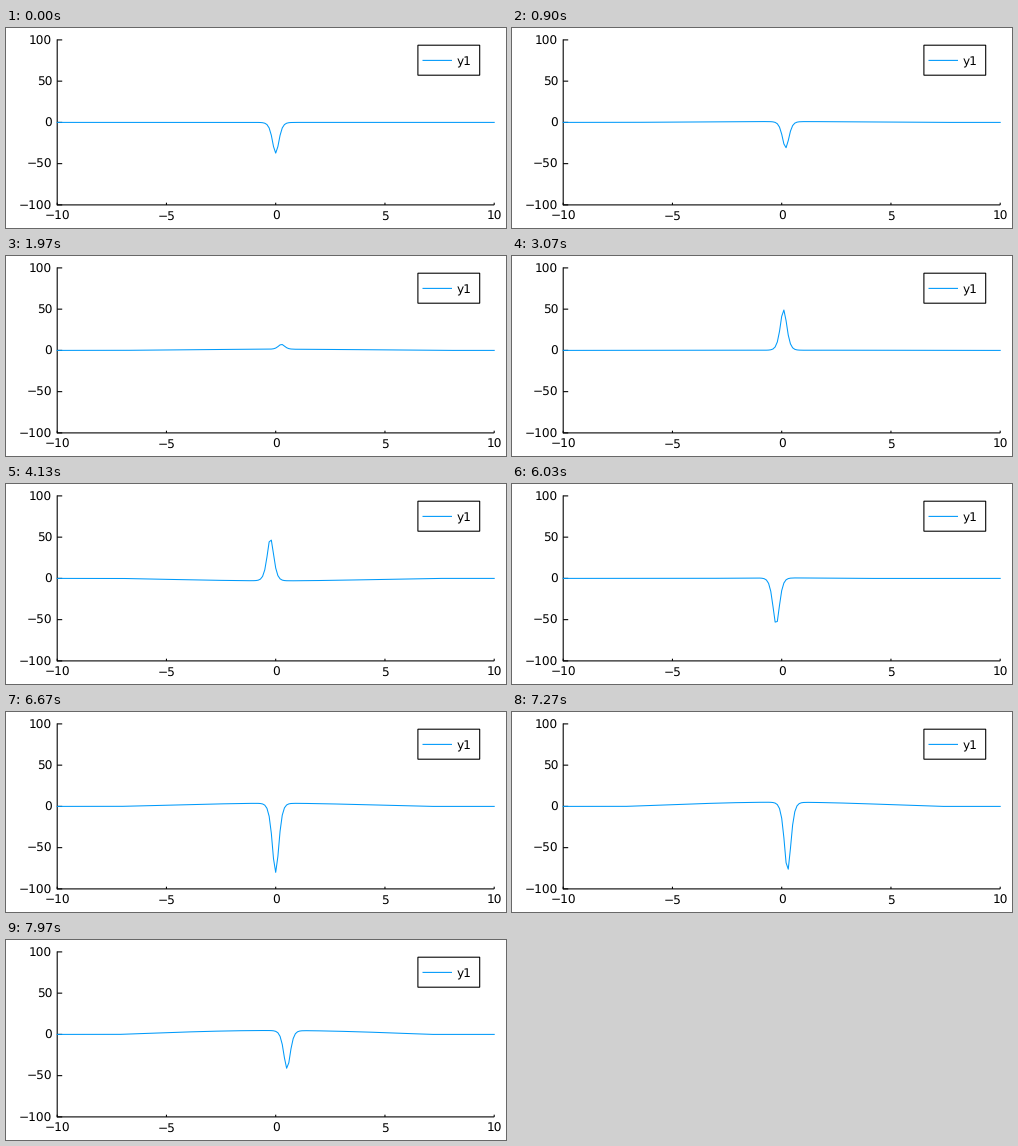
A matplotlib script that plays this animation: 500 px wide and 200 px high, repeating every 8000 ms.

```python
import numpy as np
import matplotlib.pyplot as plt
from matplotlib.animation import FuncAnimation
from matplotlib.patches import Rectangle

W, H, DPI = 500, 200, 100
STEP, FRAMES = 32, 250
LEFT, RIGHT, TOP, BOTTOM = 51.2, 488.2, 11.9, 176.9
BLUE = "#009AFA"
LINE, FONT = 0.78, 8.7
OMEGA = 2 * np.pi * 3 / 20
GROWTH = 0.115

plt.rcParams["font.family"] = "DejaVu Sans"
plt.rcParams["text.hinting"] = "none"
fig = plt.figure(figsize=(W / DPI, H / DPI), dpi=DPI, facecolor="white")
ax = fig.add_axes([0, 0, 1, 1])
ax.set_xlim(0, W)
ax.set_ylim(H, 0)
ax.axis("off")


def px(x):
    return LEFT + (x + 10) / 20 * (RIGHT - LEFT)


def py(y):
    return BOTTOM - (y + 100) / 200 * (BOTTOM - TOP)


def rule(xs, ys, color="black", z=2):
    ax.plot(xs, ys, color=color, lw=LINE, solid_capstyle="butt",
            snap=False, zorder=z)


def label(x, y, text, ha="left"):
    ax.text(x, y, text.replace("-", "\u2212"), fontsize=FONT, ha=ha,
            va="baseline", color="black", zorder=5)


# Axes, ticks and labels
rule([LEFT, LEFT], [TOP - 0.5, BOTTOM + 0.5])
rule([LEFT, RIGHT], [BOTTOM, BOTTOM])
for v in range(-100, 101, 50):
    rule([LEFT, LEFT + 5], [py(v), py(v)])
    label(46.2, py(v) + 4.5, str(v), "right")
for v in range(-10, 11, 5):
    rule([px(v), px(v)], [BOTTOM, BOTTOM - 2.2])
    label(px(v), 191.7, str(v), "center")

# Legend
ax.add_patch(Rectangle((411.9, 17.2), 61.8, 30, fc="white", ec="black",
                       lw=LINE, snap=False, zorder=4))
rule([416.5, 446], [32.4, 32.4], BLUE, 5)
label(450.3, 37, "y1")

# Height of the broad swell around the pulse, over time in seconds
SWELL_T = [0, 0.5, 1.2, 1.97, 2.6, 3.07, 3.5, 4.13, 4.7, 5.37,
           5.9, 6.3, 6.67, 7.2, 7.5, 8]
SWELL_Y = [0, 0.7, 1.3, 1.4, 0.9, 0.1, -1.6, -3, -3.3, -2.4,
           0, 2.5, 4, 5.1, 5.2, 4.7]

x = np.linspace(-10, 10, 201)
reach = np.cos(np.pi / 2 * np.clip(np.abs(x) / 7.2, 0, 1)) ** 1.1
curve, = ax.plot([], [], color=BLUE, lw=0.75, zorder=3,
                 solid_joinstyle="round")


def wave(t):
    grow = np.exp(GROWTH * t)
    center = 0.22 * grow * np.sin(OMEGA * t)
    peak = -37.5 * grow * np.cos(OMEGA * (t - 0.12))
    swell = np.interp(t - 0.03 * np.abs(x), SWELL_T, SWELL_Y) * reach
    height = peak - np.interp(center, x, swell)
    return swell + height / np.cosh((x - center) / 0.2) ** 2


def draw(i):
    curve.set_data(px(x), py(wave(i * STEP / 1000)))
    return curve,


anim = FuncAnimation(fig, draw, frames=FRAMES, interval=STEP,
                     init_func=lambda: draw(0), repeat=True, repeat_delay=0)
plt.show()
```
